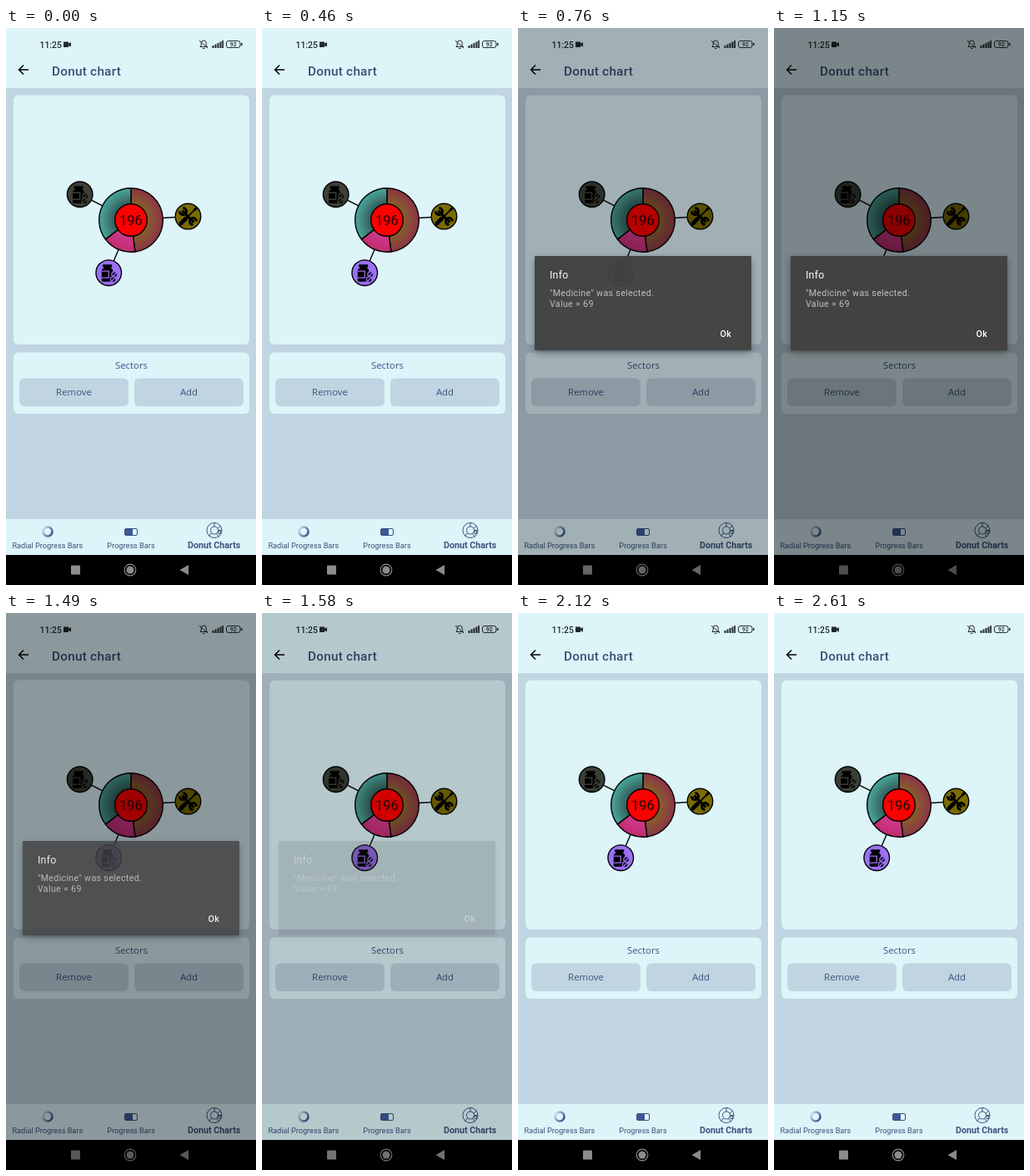
Animation, 300 px wide and 667 px high, one loop 2.64 s. Source, as an HTML page:

```html
<!DOCTYPE html>
<html lang="en">
<head>
<meta charset="utf-8">
<style>
  html, body { margin: 0; width: 100%; height: 100%; overflow: hidden; background: #c0d5e1; }
  svg { display: block; width: 100%; height: 100%; font-family: Roboto, sans-serif; }
  .light { fill: #ddf4f9; }
  .mid { text-anchor: middle; }
  .label { font: 11.4px "Open Sans", sans-serif; fill: #3f5480; text-anchor: middle; }
  .tab { font-size: 9.17px; fill: #3c527c; text-anchor: middle; }
  .line { fill: none; stroke: #3c527c; }
  .ink { fill: none; stroke: #000; }
  #dialog { fill: #fff; font-size: 10.7px; letter-spacing: .3px; }
  #dialog rect { fill: #424242; filter: drop-shadow(0 3px 4px rgba(0, 0, 0, .35)); }
</style>
</head>
<body>
<svg viewBox="0 0 300 667">
  <defs>
    <linearGradient id="spin" x1="0" y1="0" x2="1" y2=".6">
      <stop offset=".1" stop-color="#c9dce8"/><stop offset="1" stop-color="#3d5a98"/>
    </linearGradient>
    <g id="bottle">
      <path d="M-7-10H4V-7H3V-5.500Q5-5 5-3V9Q5 10.500 3.500 10.500H-7Q-8.500 10.500-8.500 9V-3Q-8.500-5-6-5.500V-7H-7Z"/>
      <path d="M-8.500-2H0V6H-8.500" fill="none" stroke="currentColor" stroke-width="1.300"/>
      <path d="M-4 0V4M-6 2H-2" stroke="#000" stroke-width="1.500"/>
      <g stroke="currentColor">
        <circle cx="7" cy="2" r="3.300"/><path d="M5 4L9 0"/>
        <circle cx="5.500" cy="8" r="3.300"/><path d="M3.500 10L7.500 6"/>
      </g>
    </g>
    <g id="tools" fill="none" stroke="#000">
      <path d="M-7-7L7 7" stroke-width="3"/>
      <path d="M-10-6A4 4 0 1 0-6-10M10 6A4 4 0 1 0 6 10" stroke-width="3"/>
      <path d="M10-10L0 0" stroke-width="1.600"/>
      <path d="M10.500-10.500L7.500-7.500" stroke-width="3"/>
      <path d="M-2.500 2.500L-8.500 8.500" stroke-width="5" stroke-linecap="round"/>
    </g>
  </defs>

  <rect width="300" height="667" fill="#c0d5e1"/>
  <g class="light">
    <rect width="300" height="72"/>
    <rect x="9" y="80.500" width="283" height="298.500" rx="6"/>
    <rect x="9" y="388.500" width="283" height="73.500" rx="6"/>
    <rect y="588" width="300" height="43"/>
  </g>

  <!-- status bar -->
  <g fill="#222c30">
    <text x="40.500" y="23.500" font-size="10.400" font-weight="500">11:25</text>
    <path d="M69 16.500h6v2l3-1.500v5.500l-3-1.500v2h-6z"/>
    <path d="M247.500 21h2v3h-2zM250.500 19.500h2v4.500h-2zM253.500 18h2v6h-2zM256.500 16.500h2v7.500h-2zM259.300 15h1.700v9h-1.700z"/>
    <rect x="264.500" y="15.500" width="16.500" height="8" rx="2.500" fill="none" stroke="#222c30"/>
    <rect x="282" y="18" width="1.500" height="3"/>
    <text x="272.700" y="22.200" font-size="7" font-weight="500" class="mid">92</text>
    <path d="M233 22.500h8.500l-1.300-2v-2.500a3 3 0 0 0-6 0v2.500zM236 24.500h2.500M232 15l10 9" fill="none" stroke="#222c30"/>
  </g>

  <!-- header -->
  <path class="ink" stroke-width="1.500" d="M27 50H16M21 44.500L15.500 50L21 55.500"/>
  <text x="55" y="57" font-size="15.300" font-weight="500" letter-spacing=".25" fill="#3a5078">Donut chart</text>

  <g id="chart" stroke="#000" stroke-width="1.400"></g>
  <circle cx="150" cy="230" r="19.300" fill="#fe0000" stroke="#000" stroke-width="1.400"/>
  <text x="150" y="236" font-size="16.500" fill="#240808" class="mid">196</text>

  <!-- sector controls -->
  <g fill="#c0d5e1">
    <rect x="16" y="419.500" width="131" height="33.500" rx="6"/>
    <rect x="154" y="419.500" width="131" height="33.500" rx="6"/>
  </g>
  <text class="label" x="150.500" y="408">Sectors</text>
  <text class="label" x="81.500" y="440">Remove</text>
  <text class="label" x="219.500" y="440">Add</text>

  <!-- tabs -->
  <circle cx="50" cy="603" r="5.500" fill="none" stroke="url(#spin)" stroke-width="2.600"/>
  <rect class="line" x="142.500" y="599.500" width="15" height="8" rx="1.500"/>
  <rect x="143" y="600" width="9" height="7" fill="#3d5a98"/>
  <g class="line">
    <circle cx="250" cy="601.500" r="9"/><circle cx="250" cy="601.500" r="4.500"/>
    <path d="M250 592.500v4.500M254.500 601.500h4.500M247 605l-4 3.500M252.500 605.500l3 4M254 599l3.500-3"/>
    <circle cx="256" cy="604" r="1.800"/>
  </g>
  <text class="tab" x="49.800" y="623">Radial Progress Bars</text>
  <text class="tab" x="150" y="623">Progress Bars</text>
  <text class="tab" x="249.700" y="623" style="font-size:10.700px;font-weight:600">Donut Charts</text>

  <!-- system navigation -->
  <rect y="631" width="300" height="36"/>
  <g fill="#8c8c8c">
    <rect x="78" y="643.500" width="11" height="11" rx="1"/>
    <circle cx="149" cy="649" r="4.500"/>
    <circle cx="149" cy="649" r="6.800" fill="none" stroke="#8c8c8c" stroke-width="1.200"/>
    <path d="M208.500 649L219 643V655Z"/>
  </g>

  <rect id="dim" width="300" height="667" opacity="0"/>
  <g id="dialog" opacity="0">
    <rect x="20" y="273" width="260" height="113" rx="1"/>
    <text x="38" y="300" font-size="12.200">Info</text>
    <g fill="#c0c0c0">
      <text x="38" y="321">"Medicine" was selected.</text>
      <text x="38" y="333.500">Value = 69</text>
    </g>
    <text x="242.500" y="370" font-weight="500">Ok</text>
  </g>
</svg>
<script>
  const LOOP = 2640, CX = 150, CY = 230, TOTAL = 196;
  const sectors = [
    { value: 94, inner: '#86602a', outer: '#8c3446', badge: '#7b6c00', icon: 'tools' },
    { value: 33, inner: '#d03a8c', outer: '#c02c70', badge: '#9b70f5', icon: 'bottle' },
    { value: 69, inner: '#355c5a', outer: '#4aa89c', badge: '#3c3f36', icon: 'bottle' }
  ];
  const byId = id => document.getElementById(id);
  const polar = (turn, r) => [CX + r * Math.sin(turn * 2 * Math.PI), CY - r * Math.cos(turn * 2 * Math.PI)];

  let from = 0;
  byId('chart').innerHTML = sectors.map(({ value, inner, outer, badge, icon }, i) => {
    const to = from + value / TOTAL, middle = (from + to) / 2;
    const [x, y] = polar(middle, 68.6);
    const slice = `M${CX} ${CY}L${polar(from, 38.3)}A38.3 38.3 0 0 1 ${polar(to, 38.3)}Z`;
    from = to;
    return `<radialGradient id="fill${i}" gradientUnits="userSpaceOnUse" cx="${CX}" cy="${CY}" r="38.3">
        <stop offset=".5" stop-color="${inner}"/><stop offset="1" stop-color="${outer}"/>
      </radialGradient>
      <path d="M${polar(middle, 38.3)}L${x} ${y}"/>
      <path d="${slice}" fill="url(#fill${i})"/>
      <circle cx="${x}" cy="${y}" r="15.3" fill="${badge}"/>
      <use href="#${icon}" transform="translate(${x} ${y})" stroke="none" color="${badge}"/>`;
  }).join('');

  const ramp = (t, start, end) => Math.min(1, Math.max(0, (t - start) / (end - start)));
  const easeOut = x => 1 - (1 - x) ** 2;

  function draw() {
    const t = performance.now() % LOOP;
    byId('dim').setAttribute('opacity', .45 * (ramp(t, 635, 840) - ramp(t, 1455, 1665)));
    byId('dialog').setAttribute('opacity', easeOut(ramp(t, 635, 785)) - ramp(t, 1469, 1600));
    requestAnimationFrame(draw);
  }
  draw();
</script>
</body>
</html>
```
